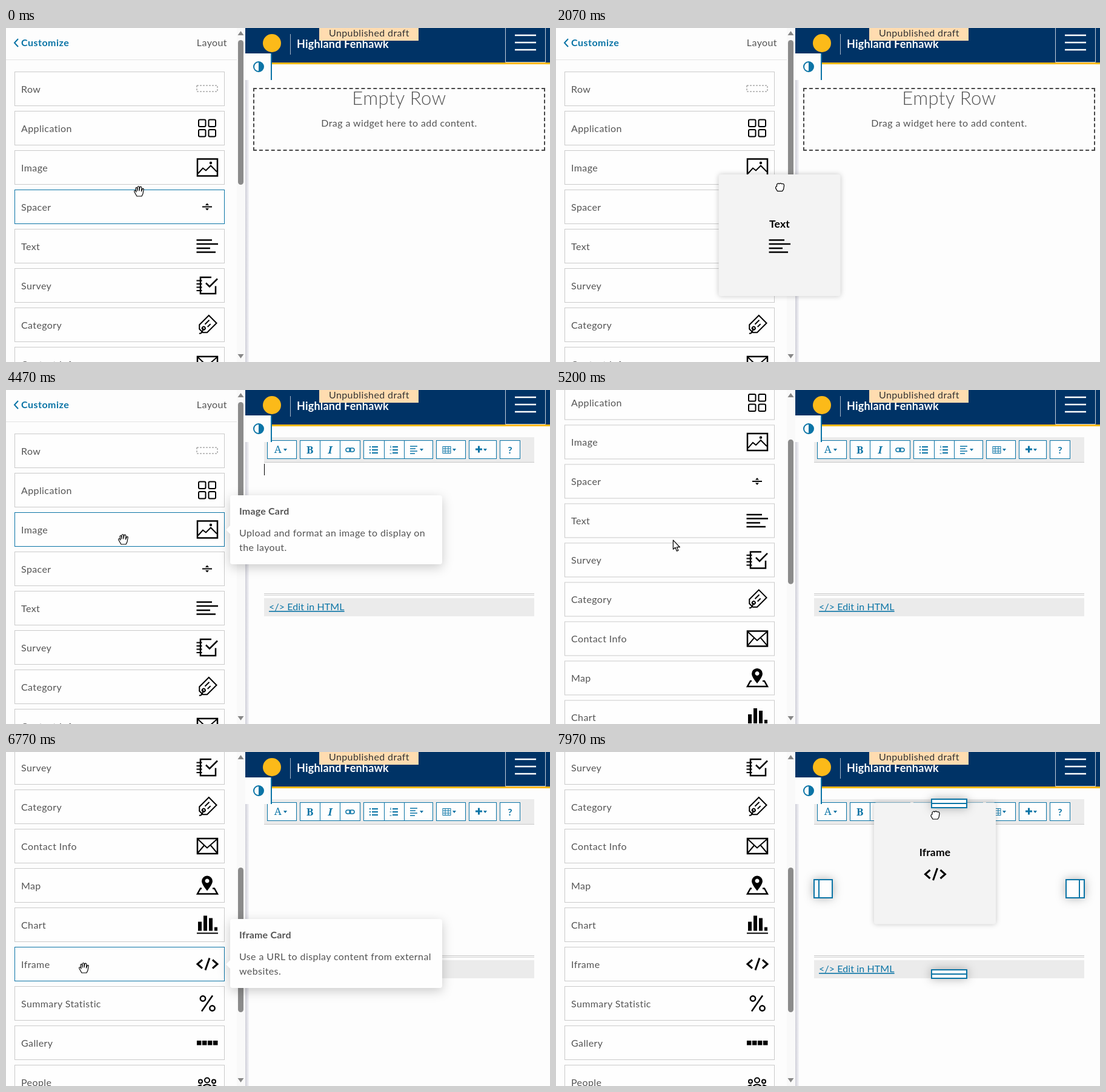
An HTML page for the animation above (8000 ms loop, 898x552 px).

```html
<!DOCTYPE html>
<html lang="en">
<head>
<meta charset="utf-8">
<title>Layout editor</title>
<style>
html, body { margin: 0; width: 100%; height: 100%; overflow: hidden; background: #fdfdfd; }
svg { display: block; }
text { font: 16px Lato, "Open Sans", sans-serif; letter-spacing: .4px; fill: #555; white-space: pre; }
.bold { font-weight: 700; letter-spacing: .2px; }
.serif { font: bold 17px "Noto Serif", serif; }
.blue { fill: #0a74a6; }
.mid { text-anchor: middle; }
.dashed { box-sizing: border-box; width: 482px; height: 104px; border: 2px dashed #474747; }
.tip { fill: #fefefe; filter: drop-shadow(0 5px 9px rgba(0, 0, 0, .2)); }
.card { fill: #f3f3f3; filter: drop-shadow(0 0 4px rgba(0, 0, 0, .22)); }
.zone { fill: #fefefe; stroke: #0a74a6; stroke-width: 2; filter: drop-shadow(0 0 8px rgba(0, 0, 0, .3)); }
.icon { fill: none; stroke: #000; stroke-width: 2.5; }
.icon .solid { fill: #000; stroke: none; }
.icon .thin { stroke-width: 2; }
.tool { fill: none; stroke: #0a74a6; stroke-width: 1.5; }
.cursor { fill: #fff; stroke: #000; stroke-width: 1.2; stroke-linejoin: round; }
</style>
</head>
<body>
<svg width="898" height="552" viewBox="0 0 898 552">
  <defs>
    <linearGradient id="edge"><stop stop-color="#cfcfd8"/><stop offset="1" stop-color="#f4f4f8"/></linearGradient>
  </defs>
  <rect width="898" height="552" fill="#fdfdfd"/>

  <g id="empty">
    <foreignObject x="408" y="99" width="482" height="104"><div class="dashed"></div></foreignObject>
    <text class="mid" x="649" y="127" style="font-size:31px;font-weight:300">Empty Row</text>
    <text class="mid" x="649" y="163">Drag a widget here to add content.</text>
  </g>

  <g id="editor">
    <path d="M426 78h446v41H426zM426 344h446v30H426z" fill="#ebebeb"/>
    <path d="M426 119.5h446M426 336.5h446M426 339h446" stroke="#c8c8c8"/>
    <g id="tools"></g>
    <text class="blue" x="434" y="364" text-decoration="underline" style="letter-spacing:.1px">&lt;/> Edit in HTML</text>
    <path id="caret" d="M426.5 122v19" stroke="#000"/>
  </g>

  <rect x="395" y="60" width="6" height="492" fill="url(#edge)"/>
  <rect x="395" width="503" height="57" fill="#003366"/>
  <rect x="395" y="57" width="503" height="3" fill="#fcba19"/>
  <circle cx="439" cy="25" r="15" fill="#fcba19"/>
  <path d="M469.5 10v34" stroke="#a9b6c6"/>
  <text class="bold" x="480" y="33" style="font-size:18px;fill:#fff">Highland Fenhawk</text>
  <rect x="517" width="164" height="21" fill="#ffdcb0"/>
  <text x="533" y="14" style="fill:#333">Unpublished draft</text>
  <path d="M824.5 0v56.5h66V0" fill="none" stroke="#c8d2dc"/>
  <path d="M840 12h35M840 24h35M840 36h35" stroke="#fff" stroke-width="2.5"/>
  <rect x="395" y="42" width="42" height="44" fill="#fdfdfd"/>
  <rect x="437" y="42" width="2" height="44" fill="#0a74a6"/>
  <circle cx="417" cy="64" r="8" fill="none" stroke="#0a74a6" stroke-width="2"/>
  <path d="M417 56a8 8 0 0 1 0 16z" fill="#0a74a6"/>

  <rect width="395" height="552" fill="#fdfdfd"/>
  <g id="panel">
    <path d="M20 18l-6 6.5 6 6.5" fill="none" stroke="#0a74a6" stroke-width="2"/>
    <text class="bold blue" x="25" y="30" style="letter-spacing:.5px">Customize</text>
    <text x="365" y="30" text-anchor="end">Layout</text>
    <path d="M0 52.5h381" stroke="#e2e2e2"/>
  </g>
  <rect x="381" width="14" height="552" fill="#f9f9f9"/>
  <path d="M382.5 12l5-7 5 7zM382.5 539l5 7 5-7z" fill="#888"/>
  <rect id="thumb" x="383" width="9" height="239" rx="4.5" fill="#8b8b8b"/>
  <g id="overlay"></g>
</svg>
<script>
const LOOP = 8000;
const $ = id => document.getElementById(id);

const rect = (x, y, w, h, more = '') => `<rect x="${x}" y="${y}" width="${w}" height="${h}" ${more}/>`;
const path = (d, more = '') => `<path d="${d}" ${more}/>`;
const dot = (x, y, r, more = '') => `<circle cx="${x}" cy="${y}" r="${r}" ${more}/>`;
const label = (x, y, s, cls = '', style = '') => `<text x="${x}" y="${y}" class="${cls}" style="${style}">${s}</text>`;
const SOLID = 'class="solid"', THIN = 'class="thin"';

// Icons are drawn around their own centre.
const widgets = [
  ['Row', rect(-17, -5.5, 34, 10, 'stroke="#808080" stroke-width="1" stroke-dasharray="3 2"')],
  ['Application', [[-14, -14], [2.5, -14], [-14, 2.5], [2.5, 2.5]]
    .map(([x, y]) => rect(x, y, 11.5, 11.5, 'rx="2" class="thin"')).join('')],
  ['Image', rect(-16, -14, 33, 28) + path('M-15 10L-7 1-2 5 6-3 16 7', THIN) + dot(6, -7.5, 2.2, SOLID)],
  ['Spacer', path('M-8 0H8', THIN) + path('M-3-2.5h6l-3-3.5zM-3 2.5h6l-3 3.5z', SOLID)],
  ['Text', path('M-17.5-10H8M-17.5-3.5H18M-17.5 3.5H5M-17.5 10H14')],
  ['Survey', path('M7-13.5H-11V13.5H14V1M-2-4L4 2 17-11') +
    path('M-17.5-8h9M-17.5-2.5h9M-17.5 3h9M-17.5 8.5h9', THIN)],
  ['Category', `<g transform="rotate(-45)" class="thin">${
    path('M-14-4L-9-9H13V9H-9L-14 4zM-2-3H8M-2 3H5')}${dot(-8, 0, 2.5)}</g>` + path('M-6 6Q-9 16-13 14', THIN)],
  ['Contact Info', rect(-16, -12.5, 33, 25) + path('M-16-12L0 3 17-12M-16 12L-5-1M17 12L6-1', THIN)],
  ['Map', path('M0 9Q-9-2-9-7A9 9 0 0 1 9-7Q9-2 0 9zM0-11a3.5 3.5 0 1 0 .1 0z', SOLID + ' fill-rule="evenodd"') +
    path('M-9 5H-11L-16 14H17L12 5H9')],
  ['Chart', path('M-17 14H18', THIN) + path('M-15-5h6v15h-6zM-6-15h6v25h-6zM3-11h6v21h-6zM12 4h5v6h-5z', SOLID)],
  ['Iframe', path('M-8-7L-16 0-8 7M9-7L17 0 9 7M4-10L-3 10', 'stroke-width="3"')],
  ['Summary Statistic', dot(-7, -8, 4.2) + dot(8.5, 8, 4.2) + path('M9-13L-9 13')],
  ['Gallery', [-17, -8, 1, 10].map(x => rect(x, -3.5, 7.5, 7.5, SOLID)).join('')],
  ['People', `<g class="thin">${dot(0, -3, 4)}${dot(-11, -1, 3)}${dot(11, -1, 3)}${
    path('M-8 14Q-8 4 0 4T8 14M-17 13Q-17 5-9 5M17 13Q17 5 9 5')}</g>`],
];
const TEXT = 4, IMAGE = 2, MAP = 8, IFRAME = 10;
const rowY = i => 72.5 + 65 * i;
const icon = (i, x, y) => `<g class="icon" transform="translate(${x} ${y})">${widgets[i][1]}</g>`;

$('panel').innerHTML += widgets.map(([name], i) =>
  rect(14.5, rowY(i), 346, 56, 'class="row" fill="#fefefe"') +
  label(25, rowY(i) + 34, name) + icon(i, 332, rowY(i) + 28)).join('');
const rows = [...document.querySelectorAll('.row')];

const arrow = x => path(`M${x} 97h6l-3 4z`, 'fill="#0a74a6" stroke="none"');
const lines = (x, w) => path([94, 99, 104].map(y => `M${x} ${y}h${w}`).join(''), 'stroke-width="2"');
$('tools').innerHTML = '<g class="tool">' +
  [[431, 49], [485, 100], [590, 115], [710, 49], [764, 46], [815, 34]]
    .map(([x, w]) => rect(x + .5, 83.5, w - 1, 30, 'fill="#fefefe" stroke-width="1"')).join('') +
  path('M518.5 83v31M551.5 83v31M624.5 83v31M657.5 83v31', 'stroke-width="1"') +
  rect(561, 96, 8, 6, 'rx="3"') + rect(567, 96, 8, 6, 'rx="3"') +
  lines(604, 10) + path('M600 94h2M600 99h2M600 104h2', 'stroke-width="2"') +
  lines(638, 9) + path('M635 92v4M633.5 99h3M633.5 105h3', 'stroke-width="1"') +
  path('M667 93h12M667 97h9M667 101h12M667 105h8') +
  rect(721, 93.5, 13, 11, 'stroke-width="1"') + path('M721 97h13M721 101h13M725 93v11M730 93v11', 'stroke-width="1"') +
  path('M775 98h11M780.5 92.5v11', 'stroke-width="3"') +
  [458, 683, 737, 788].map(arrow).join('') + '</g>' +
  label(449, 104, 'A', 'serif blue mid', 'font-weight:400') + label(502, 105, 'B', 'serif blue mid') +
  label(535, 105, 'I', 'serif blue mid', 'font-style:italic') + label(832, 104.5, '?', 'bold blue mid');

// Keys: time, then values; eased between neighbours.
const pointer = [
  [0, 220, 270], [830, 226, 347], [1120, 227, 347], [1230, 228, 349], [1570, 262, 338], [1770, 262, 338],
  [2570, 600, 101], [2730, 602, 101], [3470, 604, 106], [4300, 194, 247], [5070, 194, 247],
  [5600, 190, 255], [5800, 190, 255], [6500, 129, 357], [7200, 129, 357], [7970, 626, 104], [LOOP, 626, 104],
];
const scrolls = [[0, 0], [4670, 0], [4870, 100], [5070, 100], [5600, 391], [5800, 391], [5900, 400], [LOOP, 400]];
const tips = [
  [830, 1130, TEXT], [4330, 4700, IMAGE], [4830, 5080, TEXT], [5560, 5850, MAP], [6250, 7230, IFRAME],
];
const tipText = {
  [TEXT]: ['Add and format text to display on', 'the layout.'],
  [IMAGE]: ['Upload and format an image to display on', 'the layout.'],
  [MAP]: ['Display a web map or web scene. Use row', 'settings to adjust display.'],
  [IFRAME]: ['Use a URL to display content from external', 'websites.'],
};
const drags = [[1150, 3470, TEXT], [7240, LOOP, IFRAME]];
const active = (list, t) => list.find(([from, to]) => t >= from && t < to);

function at(keys, t) {
  const n = keys.findIndex(k => k[0] > t), a = keys[n - 1], b = keys[n];
  const u = (t - a[0]) / (b[0] - a[0]), e = u * u * (3 - 2 * u);
  return a.slice(1).map((v, i) => v + (b[i + 1] - v) * e);
}

function tooltip(i, scroll) {
  const cy = rowY(i) + 28.5 - scroll, y = Math.min(cy - 57, 276);
  return `<g class="tip">${rect(370, y, 350, 114, 'rx="4"')}${path(`M371 ${cy - 8}l-8 8 8 8z`)}</g>` +
    label(385, y + 32, widgets[i][0] + ' Card', 'bold') +
    tipText[i].map((s, n) => label(385, y + 68 + 24 * n, s)).join('');
}

function card(i, x, y, adding) {
  const [left, top, w, h] = adding ? [x - 118, y - 17, 242, 197] : [x - 101, y - 20.5, 201, 201];
  const cx = left + w / 2;
  return rect(left, top, w, h, 'rx="4" class="card"') +
    label(cx, top + 88, adding ? 'Add To Row' : widgets[i][0], 'bold mid', 'font-size:17.5px;fill:#000') +
    icon(i, cx, top + 118.5);
}

const zone = (x, y, w, h, d) => `<g class="zone">${rect(x + 1, y + 1, w - 2, h - 2)}${path(d)}</g>`;
const rowZone = filled => `<g class="zone">${rect(590, 78, 30, 30)}</g>` +
  (filled ? rect(593, 81, 24, 24, 'fill="#0a74a6"') : '');
const sideZones = zone(619, 77, 60, 16, 'M620 85h58') + zone(619, 359, 60, 16, 'M620 367h58') +
  zone(425, 210, 32, 32, 'M434 211v30') + zone(841, 210, 32, 32, 'M864 211v30');

const cursors = {
  open: 'M-4 8L-8 1Q-9-2-6-1L-5 1-6-5Q-5-8-3.5-5L-3-1-3-7Q-1-10 0-7V-1L1-7Q3-9 4-6L3.5 0 5-4Q8-6 7-2L6 4 4 8z',
  closed: 'M-4 7L-7 2Q-7-1-5-1V-4Q-3-7-1-5Q1-7 3-5Q7-6 7-2L6 4 4 7z',
  arrow: 'M0 0V15L3.5 12 6 18 8.5 17 6 11.5H11z',
};

function render(t) {
  const [x, y] = at(pointer, t), [scroll] = at(scrolls, t);
  const drag = active(drags, t), tip = active(tips, t);
  const editing = t >= 3500;
  const hover = drag || x < 14 || x > 361 ? -1
    : rows.findIndex((_, i) => y + scroll >= rowY(i) && y + scroll <= rowY(i) + 56);

  $('panel').setAttribute('transform', `translate(0 ${-scroll})`);
  $('thumb').setAttribute('y', 20 + scroll * 171 / 400);
  rows.forEach((r, i) => r.setAttribute('stroke', i === hover ? '#0a74a6' : '#cacaca'));
  $('empty').style.display = editing ? 'none' : '';
  $('editor').style.display = editing ? '' : 'none';
  const blink = (t - 6770 + 9 * 960) % 960;
  $('caret').style.display = blink >= 480 && !drag ? '' : 'none';

  let out = tip ? tooltip(tip[2], scroll) : '';
  let kind = hover < 0 || (t > 5450 && t < 5850) ? 'arrow' : 'open';
  if (drag) {
    const adding = !editing && x > 570;
    kind = adding ? 'arrow' : 'closed';
    out += card(drag[2], x, y, adding);
    if (x > 420) out += editing ? sideZones : rowZone(adding);
  }
  $('overlay').innerHTML = out + path(cursors[kind], `class="cursor" transform="translate(${x} ${y})"`);
}

const start = performance.now();
function tick() {
  render((performance.now() - start) % LOOP);
  requestAnimationFrame(tick);
}
tick();
</script>
</body>
</html>
```
